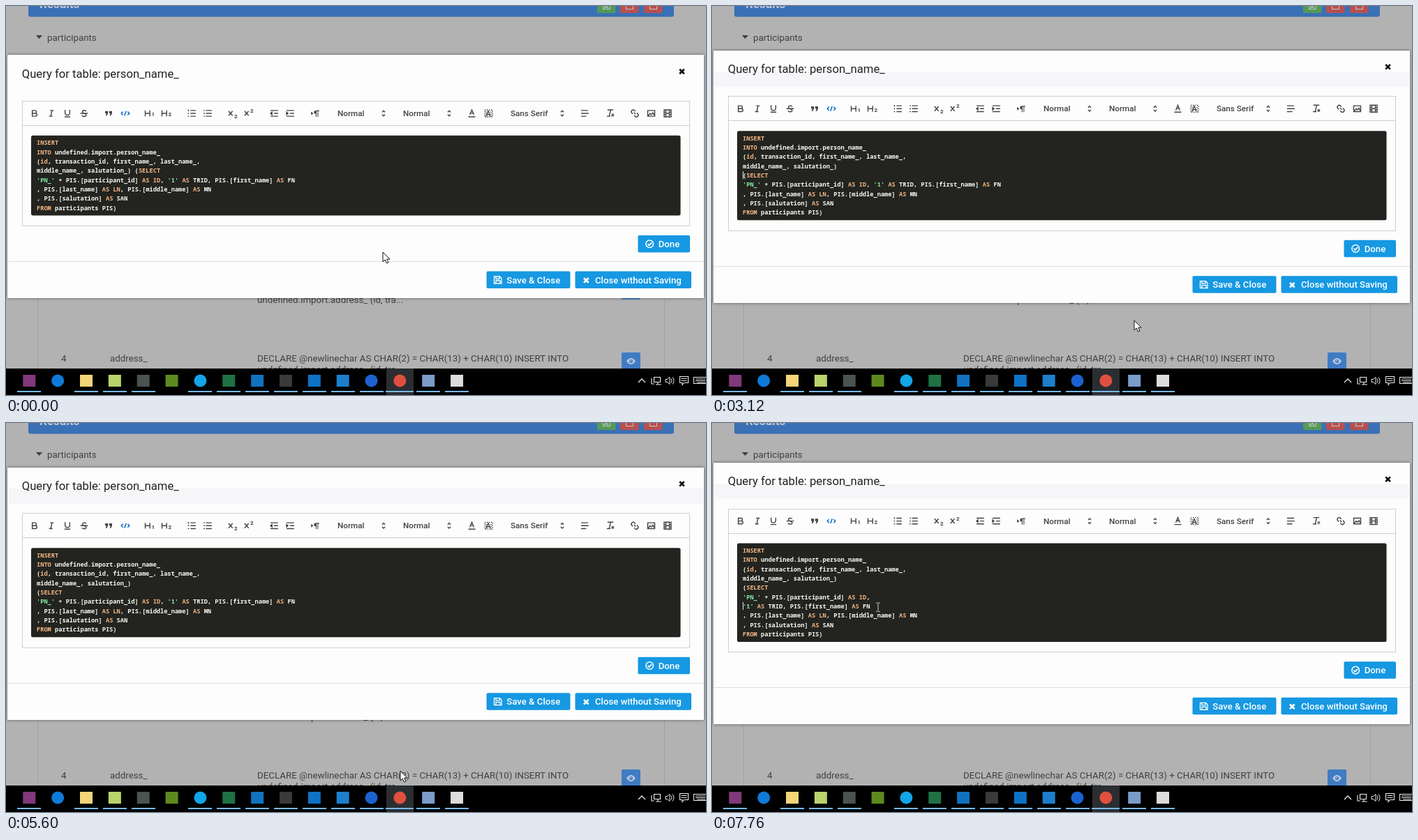
An HTML page with a canvas that plays this animation: 1003x558 px, repeating every 7990 ms.

```html
<!DOCTYPE html>
<html lang="en">
<head>
<meta charset="utf-8">
<title>Query editor</title>
<style>
  html, body { margin: 0; width: 100%; height: 100%; overflow: hidden; background: #b2b2b2; }
  canvas { display: block; }
</style>
</head>
<body>
<canvas id="stage" width="1003" height="558"></canvas>
<script>
const ctx = document.getElementById('stage').getContext('2d');
const LOOP = 7990;
const LINE = 13.33, CHAR = 5.21, CODE_X = 44;
const UI = 'Roboto, sans-serif';
const BLUE = '#1698e2', INK = '#444';

const HEAD = ['INSERT', 'INTO undefined.import.person_name_', '(id, transaction_id, first_name_, last_name_,'];
const TAIL = [', PIS.[last_name] AS LN, PIS.[middle_name] AS MN', ', PIS.[salutation] AS SAN', 'FROM participants PIS)'];
const COLUMNS = 'middle_name_, salutation_)';
const ID_PART = "'PN_' + PIS.[participant_id] AS ID,";
const FN_PART = "'1' AS TRID, PIS.[first_name] AS FN";
const STAGES = [
  { from: 0, lines: [...HEAD, COLUMNS + ' (SELECT', ID_PART + ' ' + FN_PART, ...TAIL] },
  { from: 3120, lines: [...HEAD, COLUMNS, '(SELECT', ID_PART + ' ' + FN_PART, ...TAIL] },
  { from: 5680, lines: [...HEAD, COLUMNS, '(SELECT', ID_PART, FN_PART, ...TAIL] }
];

// Visible caret spans: start, end, column, row
const CARETS = [
  [180, 710, 71, 4], [1240, 1770, 71, 4], [2300, 2970, 27, 3],
  [3120, 3660, 0, 4], [4190, 4600, 0, 4], [4630, 5150, 36, 5],
  [5680, 6220, 0, 6], [6740, 7260, 0, 6], [7760, LOOP, 0, 6]
];

// Pointer moves: start, end, steps, way points
const MOVES = [
  [130, 370, 4, [[540, 353], [330, 318], [319, 190]]],
  [580, 1320, 11, [[319, 190], [300, 290], [222, 325], [131, 230], [150, 174], [193, 222]]],
  [2110, 2300, 4, [[193, 222], [187, 232]]],
  [2530, 2830, 5, [[187, 232], [519, 455], [607, 463], [605, 451]]],
  [3890, 4630, 11, [[605, 451], [430, 514], [271, 473], [215, 393], [305, 335], [224, 251]]],
  [4690, 4770, 2, [[224, 251], [232, 251]]],
  [5150, 5370, 4, [[232, 252], [565, 499]]],
  [6220, 6940, 11, [[565, 499], [475, 356], [388, 336], [276, 266]]],
  [7020, 7760, 11, [[276, 266], [280, 270], [255, 258], [238, 264]]]
];

// Toolbar glyphs on an 18-unit grid: x centre, path, fill?, colour?
const ICONS = [
  [41, 'M5 4H9.5a2.5 2.5 0 0 1 0 5H5zM5 9h5.5a2.5 2.5 0 0 1 0 5H5z'],
  [65, 'M7 4H13M5 14H11M8 14L10 4'],
  [88, 'M5 3V8a4 4 0 0 0 8 0V3M4 15H14'],
  [112, 'M12.5 5.5C11 3 6 3.5 6 6.5S12.5 9 12.5 12S6.5 15 5.2 12.5M2.5 9H15.5'],
  [147, 'M3 5H8V9L6 13H4L5 9H3zM10 5H15V9L13 13H11L12 9H10z', true],
  [171, 'M5 6L2 9L5 12M13 6L16 9L13 12M10.5 5L7.5 13', false, '#06c'],
  [204.5, 'M3 4V14M11 4V14M3 9H11'],
  [228.5, 'M3 4V14M11 4V14M3 9H11'],
  [266, 'M7 4H16M7 9H16M7 14H16M3.5 2.5V5.5M2.5 9H4.5M2.5 14H4.5'],
  [289, 'M6 4H16M6 9H16M6 14H16M2 4H4M2 9H4M2 14H4'],
  [323, 'M4 5L11 13M11 5L4 13'],
  [346, 'M4 5L11 13M11 5L4 13'],
  [384, 'M3 14H16M3 4H16M9 9H16M5.5 7V11L3 9z'],
  [407, 'M3 14H16M3 4H16M9 9H16M3 7V11L5.5 9z'],
  [443, 'M2 6L6 9L2 12zM10 4a3 3 0 0 0 0 6zM9.5 4H16V5.5H9.5zM10 4H11.3V15H10zM13 4H14.3V15H13z', true],
  [667.5, 'M5.5 11.5L9 3L12.5 11.5M7 8.5H11M3 15H15'],
  [829, 'M3 4H15M3 9H16M3 14H12'],
  [866, 'M4 3H14M9.5 3L7 14M3 14H9M11 10L15 14M15 10L11 14'],
  [901, 'M10.5 10.5L7.5 7.5M10 5.5L8.5 4a3 3 0 0 0-4.5 4.5L5.5 10M8 12.5l1.5 1.5a3 3 0 0 0 4.5-4.5L12.5 8'],
  [924.5, 'M3 4H15V14H3zM4 13L7 9L9 11L12 8L14 12'],
  [948, 'M3 3H15V15H3zM6 3V15M12 3V15M6 9H12M3 7H6M3 11H6M12 7H15M12 11H15']
].map(([x, d, fill, color]) => ({ x, path: new Path2D(d), fill, color: color || INK }));
const PICKER = new Path2D('M6.5 11L9 13.5L11.5 11M6.5 7L9 4.5L11.5 7');
const ARROW = new Path2D('M0 0V14L3.2 11L5.6 16L8 15L5.7 10.2H10z');

// Taskbar buttons: colour, round?, open?
const APPS = [
  ['#80397b', 0, 1], ['#0f7ad8', 1, 0], ['#f5d578', 0, 1], ['#b8d46a', 0, 1],
  ['#4a5350', 0, 1], ['#5c8a1e', 0, 0], ['#12a5e8', 1, 1], ['#1f7145', 0, 1],
  ['#1072c0', 0, 1], ['#3a3a3a', 0, 1], ['#0e72c6', 0, 1], ['#1d7fcb', 0, 1],
  ['#1b62d0', 1, 1], ['#e0503f', 1, 1], ['#7b9cc8', 0, 1], ['#dcdcdc', 0, 1]
];

function rect(x, y, w, h, color, radius = 0) {
  ctx.fillStyle = color;
  ctx.beginPath();
  ctx.roundRect(x, y, w, h, radius);
  ctx.fill();
}

function frame(x, y, w, h, color) {
  ctx.strokeStyle = color;
  ctx.lineWidth = 1;
  ctx.strokeRect(x + .5, y + .5, w - 1, h - 1);
}

function text(str, x, y, size, color, weight = 400, family = UI) {
  ctx.font = `${weight} ${size}px ${family}`;
  ctx.fillStyle = color;
  ctx.fillText(str, x, y);
}

function stroke(path, color, width) {
  ctx.strokeStyle = color;
  ctx.lineWidth = width;
  ctx.stroke(typeof path === 'string' ? new Path2D(path) : path);
}

function disc(x, y, r, color) {
  ctx.fillStyle = color;
  ctx.beginPath();
  ctx.arc(x, y, r, 0, 7);
  ctx.fill();
}

function glyph(x, y, path, color, fill) {
  ctx.save();
  ctx.translate(x, y);
  ctx.scale(.833, .833);
  ctx.translate(-9, -9);
  if (fill) {
    ctx.fillStyle = color;
    ctx.fill(path);
  } else stroke(path, color, 1.7);
  ctx.restore();
}

function cross(x, y, r, color) {
  stroke(`M${x - r} ${y - r}l${2 * r} ${2 * r}M${x + r} ${y - r}l${-2 * r} ${2 * r}`, color, 2.7);
}

function eyeButton(y) {
  rect(882, y, 27, 24.5, '#3f7cc4', 2);
  ctx.fillStyle = '#bcc9da';
  ctx.fill(new Path2D(`M889 ${y + 12.5}q6.5 -9 13 0q-6.5 9 -13 0z`));
  disc(895.5, y + 12.5, 2.6, '#3f7cc4');
  disc(895, y + 12, 1, '#bcc9da');
}

function drawPage() {
  rect(0, 0, 1003, 558, '#b2b2b2');
  rect(32, -10, 925, 25.5, '#3a70b5', 3);
  text('Results', 48, 3, 17, '#bfc9d8', 700);
  [[847, '#539a58'], [880, '#b9504f'], [914, '#b9504f']].forEach(([x, color]) => {
    rect(x, -12, 26.5, 22, color, 2);
    frame(x + 8, -6, 11, 11, '#c6c6c6');
  });
  stroke('M857 -2l6 5M863 -2l-6 5', '#c6c6c6', 1.3);
  ctx.fillStyle = '#3c3c3c';
  ctx.fill(new Path2D('M43 42h9l-4.5 5z'));
  text('participants', 59, 49.5, 13.33, '#404040');

  rect(45, 400, 1, 120, '#a0a0a0');
  rect(943, 400, 1, 120, '#a0a0a0');
  const second = 'undefined.import.address_ (id, tra...';
  text(second, 360, 426, 13.33, '#404040');
  text('4', 79, 510, 13.33, '#404040');
  text('address_', 149, 510, 13.33, '#404040');
  text('DECLARE @newlinechar AS CHAR(2) = CHAR(13) + CHAR(10) INSERT INTO', 360, 510, 13.33, '#404040');
  text(second, 360, 526, 13.33, '#404040');
  eyeButton(396.5);
  eyeButton(497);
}

function drawTaskbar() {
  rect(0, 520, 1003, 38, '#000');
  rect(545, 520, 39, 38, '#2b2e31');
  APPS.forEach(([color, round, open], i) => {
    const x = 33.3 + i * 40.85;
    if (round) disc(x, 537.5, 9, color);
    else rect(x - 9, 529, 18, 17, color);
    const wide = i === 13 ? 20 : 17;
    if (open) rect(Math.round(x - wide), 552, wide * 2, 2, '#76b9ed');
  });
  const tray = '#e8e8e8';
  stroke('M906 540l5 -5l5 5', tray, 1.3);
  stroke('M928.5 532.5h9v7h-9zM931 543h8M934 540v3M925 534v8h4', tray, 1.2);
  stroke('M945 535.5h2.5l3.5 -3v10l-3.5 -3H945zM953 534.5q2 3 0 6M955 532.5q4 5 0 10', tray, 1);
  stroke('M965.5 531.5h12v9h-6l-2.5 3v-3h-3.5zM967.5 534.5h8M967.5 537.5h8', tray, 1.1);
  stroke('M985.5 532.5h18v9h-18zM988 535h14M988 537.5h14M990 540h12', tray, 1.1);
}

function drawToolbar(c) {
  ICONS.forEach(icon => glyph(icon.x, c, icon.path, icon.color, icon.fill));
  [['1', 208.5, c + 4.3], ['2', 232.5, c + 4.3], ['2', 327, c + 6.5], ['2', 350, c - 1]]
    .forEach(([digit, x, y]) => text(digit, x, y, 8, INK, 700));
  [['Normal', 475, 541], ['Normal', 569, 635], ['Sans Serif', 723, 797]].forEach(([label, x, caret]) => {
    text(label, x, c + 4, 11.67, INK, 500);
    glyph(caret, c, PICKER, INK);
  });
  ctx.setLineDash([1.5, 1.5]);
  stroke(`M686 ${c - 5}h11v10h-11zM688 ${c - 2.5}v7M695 ${c - 2.5}v7`, INK, 1.3);
  ctx.setLineDash([]);
  text('A', 687.5, c + 4, 10.5, INK, 700);
}

function drawCode(lines, baseline) {
  const token = /('[^']*'|\b(?:INSERT|INTO|SELECT|AS|FROM|id|ID|LN)\b)/;
  lines.forEach((line, row) => {
    let col = 0;
    line.split(token).forEach((part, i) => {
      const color = i % 2 === 0 ? '#f8f8f2' : part[0] === "'" ? '#84eaa6' : '#f3b684';
      text(part, CODE_X + col * CHAR, baseline + row * LINE, CHAR / .6, color, 600, '"Noto Sans Mono", monospace');
      col += part.length;
    });
  });
}

function button(x, y, w, label, labelX) {
  rect(x, y, w, 24.5, BLUE, 2);
  text(label, labelX, y + 17, 13.2, '#fff', 500);
}

function drawModal(stage, t) {
  const up = -6.67 * stage, down = 6.67 * stage;
  const top = Math.round(70.3 + up), bottom = Math.round(419 + down);
  ctx.save();
  ctx.shadowColor = 'rgba(0,0,0,.5)';
  ctx.shadowBlur = 4;
  rect(2, top, 998, bottom - top, '#fdfdfd', 1);
  ctx.restore();
  if (stage) rect(3, top + 30, 996, 22, '#f6f6f8');

  text('Query for table: person_name_', 22.7, 102.5 + up, 16.67, '#222');
  cross(968.5, 94 + up, 3.3, '#111');

  const barTop = Math.round(136 + up), barLine = Math.round(171 + up);
  const editorEnd = Math.round(316 + down);
  frame(23, barTop, 957, editorEnd - barTop, '#cfcfcf');
  rect(23, barLine, 957, 1, '#cfcfcf');
  drawToolbar(154 + up);

  rect(36, 185.8 + up, 930.5, 114.8 + 2 * down, '#23241f', 2.5);
  const baseline = 199.2 + up;
  drawCode(STAGES[stage].lines, baseline);
  const caret = CARETS.find(([from, to]) => t >= from && t < to);
  if (caret) {
    const [, , col, row] = caret;
    rect(Math.round(CODE_X + col * CHAR), Math.round(baseline + row * LINE - 8.5), 1, 11, '#f0f0f0');
  }

  button(905.5, 329 + down, 74.5, 'Done', 934.7);
  const y = 341.3 + down;
  stroke(`M927.5 ${y}a5.3 5.3 0 1 1 -10.6 0a5.3 5.3 0 1 1 10.6 0z`, '#fff', 1.5);
  stroke(`M919.5 ${y}l2 2l3.7 -3.8`, '#fff', 1.8);

  rect(2, Math.round(366 + down), 998, 1, '#dedede');
  button(688.5, 380.5 + down, 120, 'Save & Close', 717.3);
  button(815.5, 380.5 + down, 166.5, 'Close without Saving', 844);
  const f = 393 + down;
  stroke(`M699.5 ${f - 5}h8l2.5 2.5v7.5h-10.5zM702 ${f - 5}v3.5h5v-3.5M702 ${f + 5}v-4h6v4`, '#fff', 1.3);
  cross(831.3, f + .5, 3.3, '#fff');
}

function along(points, p) {
  const pos = p * (points.length - 1);
  const i = Math.min(Math.floor(pos), points.length - 2);
  const [a, b] = [points[i], points[i + 1]];
  return a.map((v, k) => Math.round(v + (b[k] - v) * (pos - i)));
}

function pointerAt(t) {
  let pos = MOVES[0][3][0];
  for (const [start, end, steps, points] of MOVES) {
    if (t < start) break;
    const done = Math.floor((t - start) / (end - start) * (steps - 1) + 1e-6) + 1;
    pos = along(points, Math.min(done / steps, 1));
  }
  return pos;
}

function drawPointer(stage, [x, y]) {
  const inEditor = x > 23 && x < 980 && y > 171 - 6.67 * stage && y < 315 + 6.67 * stage;
  ctx.save();
  ctx.translate(x, y);
  if (inEditor) {
    ctx.globalCompositeOperation = 'difference';
    stroke('M-3 -6H-.5M.5 -6H3M0 -5.5V6M-3 6.5H-.5M.5 6.5H3', '#e4e4e4', 1.1);
  } else {
    ctx.fillStyle = '#fff';
    ctx.fill(ARROW);
    stroke(ARROW, '#111', 1);
  }
  ctx.restore();
}

function draw(t) {
  const stage = STAGES.filter(s => t >= s.from).length - 1;
  drawPage();
  drawModal(stage, t);
  drawTaskbar();
  drawPointer(stage, pointerAt(t));
}

const began = performance.now();
function tick() {
  draw((performance.now() - began) % LOOP);
  requestAnimationFrame(tick);
}
tick();
</script>
</body>
</html>
```
